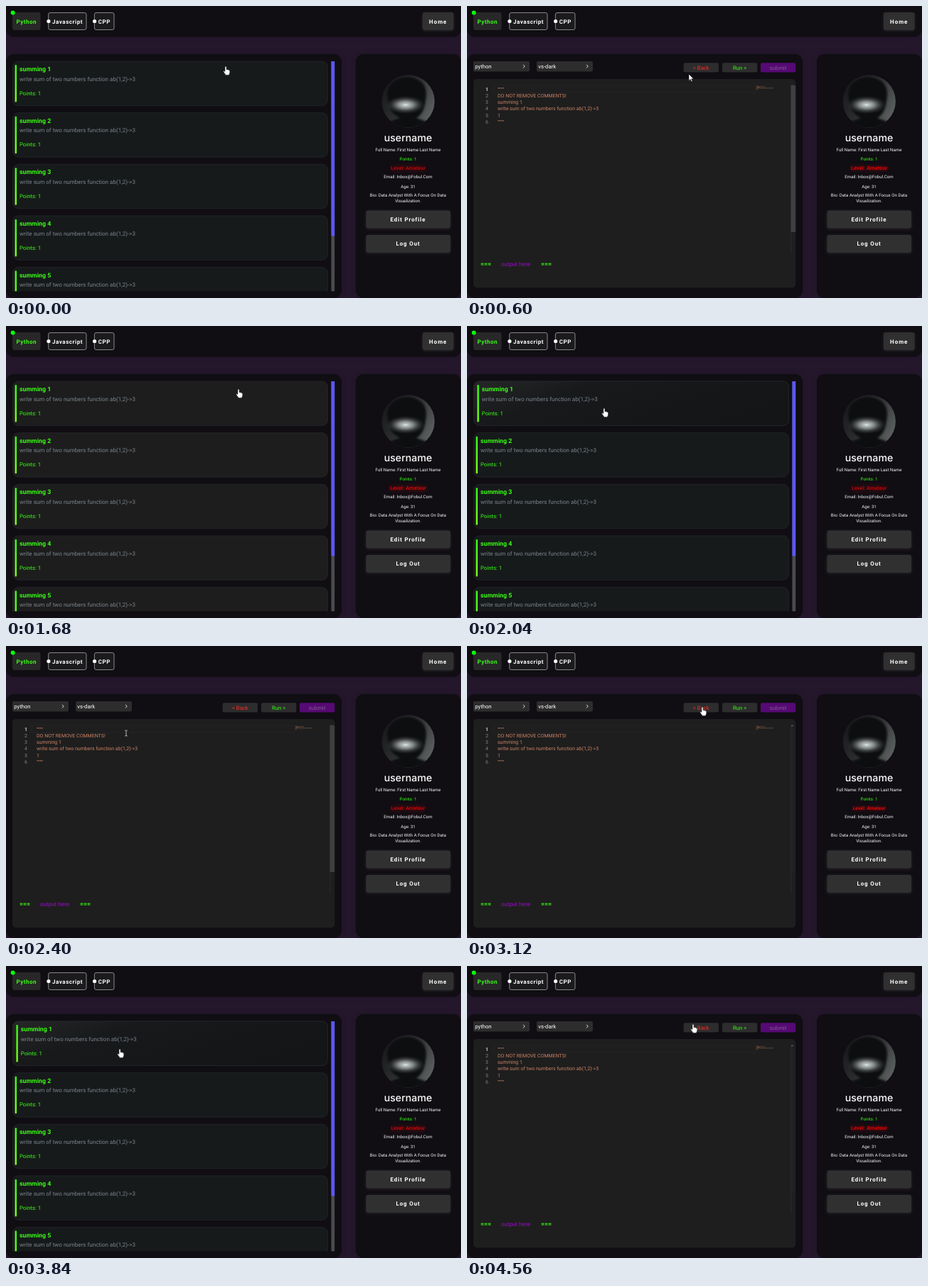
An HTML page that plays this animation: 640x412 px, repeating every 4.68 s.

```html
<!DOCTYPE html>
<html lang="en">
<head>
<meta charset="utf-8">
<title>Coding tasks</title>
<style>
  html, body { margin: 0; width: 100%; height: 100%; overflow: hidden; background: #24172c; }
  svg { display: block; width: 100%; height: 100%; }
  text { font-family: Roboto, "Open Sans", sans-serif; text-rendering: geometricPrecision; white-space: pre; }
  .soft { filter: drop-shadow(0 0 3px rgba(0, 0, 0, .2)); }
  .lift { filter: drop-shadow(0 1px 2px rgba(60, 60, 60, .55)); }
  .wide { font-family: Inter, sans-serif; }
  .plain { font-family: "Liberation Sans", sans-serif; }
  .quote { font-family: "Open Sans", "Noto Sans", sans-serif; }
</style>
</head>
<body>
<svg id="stage" viewBox="0 0 640 412" xmlns="http://www.w3.org/2000/svg"></svg>
<script>
const LOOP = 4680, STEP = 120;
const GREEN = '#39ff14';

// Screen changes: start time and which view is shown
const VIEWS = [[0, 'list'], [600, 'editor'], [1560, 'list'], [2280, 'editor'], [3360, 'list'], [4080, 'editor']];

// Pointer hot spot: time, x, y
const PATH = [
  [0, 309, 86], [240, 310, 87], [600, 312, 96], [1080, 312.5, 97], [1440, 326, 89], [1680, 327, 90],
  [2160, 168, 122], [2400, 169, 123], [2640, 176, 122], [3120, 331, 87], [3360, 330, 87],
  [3840, 160, 118], [4080, 162, 118], [4560, 318, 83], [4680, 309, 86]
];

const rect = (x, y, w, h, fill, r = 0, more = '') =>
  `<rect x="${x}" y="${y}" width="${w}" height="${h}" rx="${r}" fill="${fill}" ${more}/>`;
const dot = (x, y, r, fill) => `<circle cx="${x}" cy="${y}" r="${r}" fill="${fill}"/>`;
const text = (s, x, y, size, fill, { w = 400, a = 'start', ls = 0, c = '' } = {}) =>
  `<text class="${c}" x="${x}" y="${y}" font-size="${size}" fill="${fill}" font-weight="${w}" text-anchor="${a}" letter-spacing="${ls}">${s}</text>`;
const mid = (s, y, size, fill, o = {}) => text(s, 565.5, y, size, fill, { a: 'middle', ...o });

const defs = `<defs>
  <linearGradient id="hover" x2="1" y2=".4">
    <stop offset="0" stop-color="#262727"/><stop offset=".35" stop-color="#17191b"/><stop offset="1" stop-color="#131517"/>
  </linearGradient>
  <linearGradient id="bar" x2="0" y2="1">
    <stop offset="0" stop-color="#35ff14"/><stop offset="1" stop-color="#7cff14"/>
  </linearGradient>
  <linearGradient id="photo" x2="1" y2=".6">
    <stop offset="0" stop-color="#121314"/><stop offset=".5" stop-color="#2a2c2d"/><stop offset="1" stop-color="#5a5e5e"/>
  </linearGradient>
  <radialGradient id="gleam">
    <stop offset="0" stop-color="#dde4e4"/><stop offset=".4" stop-color="#9aa1a1" stop-opacity=".8"/><stop offset="1" stop-color="#333" stop-opacity="0"/>
  </radialGradient>
  <clipPath id="round"><circle cx="565.7" cy="134.5" r="37.2"/></clipPath>
  <clipPath id="scroll"><rect x="0" y="77" width="456" height="325.5"/></clipPath>
</defs>`;

function frame() {
  return rect(0, 0, 640, 412, '#24172c')
    + rect(0, -14, 640, 57.5, '#100d13', 11, 'class="soft"')
    + rect(0, 68, 472, 344, '#100d13', 11, 'class="soft"')
    + rect(492, 68, 148, 344, '#100d13', 11, 'class="soft"');
}

function nav() {
  const o = { w: 700, ls: .55 };
  const tab = (x, w, s) => rect(x, 9.5, w, 24, '#1b1a1c', 2.5, 'stroke="#a8a8a8" stroke-width=".8"')
    + dot(x + .2, 21.5, 2.6, '#fff') + text(s, x + 5.3, 24.5, 8, '#fff', o);
  return rect(9, 9, 39.5, 25, '#282829', 3) + dot(9.7, 9.6, 3, '#0bff0b') + text('Python', 14.4, 24.5, 8, GREEN, o)
    + tab(59.7, 53.3, 'Javascript') + tab(124.4, 27.6, 'CPP')
    + rect(586, 9, 43.5, 25, '#303030', 3, 'class="lift"')
    + text('Home', 595, 24.5, 8, '#fff', { w: 700, ls: 1 });
}

function profile() {
  const button = (y, s) => rect(506.5, y, 118.5, 25, '#303030', 3, 'class="lift"')
    + mid(s, y + 15.4, 8, '#fff', { w: 700, ls: .85 });
  const photo = `<g clip-path="url(#round)">${rect(528, 97, 76, 75, 'url(#photo)')}
    <path d="M537 131Q534 112 549 104Q566 95 583 106Q594 115 590 134Q588 152 577 158L600 166V174H531V166L554 158Q539 151 537 131Z" fill="#0d0e0f" style="filter:blur(1.5px)"/>
    <ellipse cx="562" cy="139.5" rx="28" ry="13" fill="url(#gleam)"/></g>`;
  return photo
    + mid('username', 191, 14.2, '#fff', { w: 500, c: 'wide' })
    + mid('Full Name: First Name Last Name', 205.3, 6.15, '#f4f4f4')
    + mid('Points: 1', 218.2, 6.15, GREEN)
    + `<g id="level">${text('Level: Amateur', 0, 2.6, 7.5, '#f00', { w: 500, a: 'middle', ls: .15 })}</g>`
    + mid('Email: Inbox@Fobul.Com', 243.4, 6.15, '#f4f4f4')
    + mid('Age: 31', 256.6, 6.15, '#f4f4f4')
    + mid('Bio: Data Analyst With A Focus On Data', 269.3, 6.15, '#f4f4f4')
    + mid('Visualization.', 277, 6.15, '#f4f4f4')
    + button(288.5, 'Edit Profile') + button(323, 'Log Out');
}

function list() {
  let cards = '';
  for (let i = 0; i < 5; i++) {
    const y = 78 + i * 72.65;
    cards += rect(9.5, y, 443, 62.5, '#171a1b', 8, 'class="card" stroke="#24282a" stroke-width=".8"')
      + (i ? '' : rect(9.5, y, 443, 62.5, 'url(#hover)', 8, 'id="glow" stroke="#24282a" stroke-width=".8"'))
      + `<g ${i ? '' : 'id="first"'}>${rect(12.6, y + 5, 2.4, 52.5, 'url(#bar)', 1)}`
      + text(`summing ${i + 1}`, 19, y + 14, 8.8, GREEN, { w: 600 })
      + text('write sum of two numbers function ab(1,2)-&gt;3', 19, y + 27.7, 8.05, '#7b848c')
      + text('Points: 1', 19, y + 47.6, 7.75, GREEN) + '</g>';
  }
  return `<g id="list"><g clip-path="url(#scroll)">${cards}</g>`
    + rect(457.5, 78, 4.7, 324.5, '#4b4b4b') + rect(457.5, 78, 4.7, 246.5, '#5b57f5') + '</g>';
}

function editor() {
  const select = (x, s) => rect(x, 78, 79, 14.5, '#2d2d2e', 2) + text(s, x + 2.3, 88, 7.7, '#fff')
    + `<path d="M${x + 70} 82.8l2.2 2.3l-2.2 2.3" fill="none" stroke="#ddd" stroke-width="1"/>`;
  const button = (x, s, bg, fg) => rect(x, 80.2, 49.3, 13.2, bg, 2)
    + text(s, x + 24.7, 89.6, 7.7, fg, { a: 'middle' });
  const lines = ['"""', 'DO NOT REMOVE COMMENTS!', 'summing 1', 'write sum of two numbers function ab(1,2)-&gt;3', '1', '"""'];
  const code = lines.map((s, i) => {
    const y = 119.5 + i * 9.3;
    const quote = s[0] === '"';
    return text(i + 1, 30, y, 7, i ? '#858585' : '#d0d0d0', { a: 'end', w: i ? 400 : 600 })
      + text(s, 43, y, 7.03, '#cc8266', quote ? { c: 'quote', w: 600 } : {})
      + rect(407, 112.6 + i, [2, 12, 5, 24, 1, 2][i], .6, '#8a5a48');
  }).join('');
  return '<g id="editor">' + select(9, 'python') + select(98, 'vs-dark')
    + button(304.7, '&lt; Back', '#2d2d2e', '#ff2a20') + button(359, 'Run &gt;', '#2d2d2e', GREEN)
    + button(413, 'submit', '#560a74', '#7f5b8c')
    + rect(9, 103, 453.3, 294.5, '#1e1e1e', 5)
    + rect(36, 112, 369, 10, 'none', 0, 'stroke="#272727" stroke-width=".8"')
    + code
    + rect(455.6, 112, .7, 237, '#303030') + rect(456, 111.8, 3, .8, '#8c8c8c')
    + rect(455.6, 112, 6.6, 207, '#3f3f3f', 0, 'id="thumb"')
    + text('===', 19, 367.2, 8.8, GREEN, { w: 700 }) + text('===', 104, 367.2, 8.8, GREEN, { w: 700 })
    + text('output here', 48, 367, 8.2, '#9d0bd0', { c: 'plain' })
    + '</g>';
}

const pointers = `
  <path id="arrow" d="M0 0V9.4L2.2 7.4L3.7 10.8L5.2 10.1L3.7 6.8H6.7Z" fill="#fff" stroke="#111" stroke-width=".6"/>
  <path id="hand" d="M-1 0Q0 -1.8 1.1 0V3.6Q2.2 3 2.8 4Q4 3.5 4.4 4.5Q5.8 4.2 5.8 5.8V8Q5.7 9.4 4.8 10.4V11.4H-.4V10.4Q-2 8.7 -3.3 6.5Q-3 5.1 -1 6.4Z" fill="#fff" stroke="#111" stroke-width=".5"/>
  <path id="beam" d="M-1.8 -4Q0 -4 0 -3V3Q0 4 -1.8 4M1.8 -4Q0 -4 0 -3M0 3Q0 4 1.8 4" fill="none" stroke="#d8d8d8" stroke-width=".8"/>`;

const $ = id => document.getElementById(id);
$('stage').innerHTML = defs + frame() + nav() + profile() + list() + editor() + pointers;
const cards = document.querySelectorAll('.card');

const clamp = v => Math.max(0, Math.min(1, v));
const smooth = v => { v = clamp(v); return v * v * (3 - 2 * v); };
const show = (id, on) => $(id).setAttribute('visibility', on ? 'visible' : 'hidden');

function pointerAt(t) {
  const i = PATH.findIndex(p => p[0] > t);
  const [t0, x0, y0] = PATH[i - 1], [t1, x1, y1] = PATH[i];
  const k = smooth((t - t0) / (t1 - t0));
  return [x0 + (x1 - x0) * k, y0 + (y1 - y0) * k];
}

function pointerKind(view, x, y) {
  if (view === 'list') return 'hand';
  if (x > 304 && x < 354 && y > 80 && y < 93.5) return 'hand';
  return y > 103 ? 'beam' : 'arrow';
}

function draw(t) {
  const [start, view] = VIEWS.filter(v => v[0] <= t).pop();
  const age = t - start;
  show('list', view === 'list');
  show('editor', view === 'editor');

  const hover = smooth((age - 120) / 360);
  $('first').setAttribute('transform', `translate(${1.8 * hover} 0)`);
  $('glow').setAttribute('opacity', hover);
  const fresh = start > 0 && age < 240;
  cards.forEach(c => c.setAttribute('fill', fresh ? '#1d1d1d' : '#171a1b'));
  $('thumb').setAttribute('opacity', 1 - .9 * smooth((age - 120) / 360));

  const [x, y] = pointerAt(t);
  const kind = pointerKind(view, x, y);
  for (const id of ['arrow', 'hand', 'beam']) show(id, id === kind);
  $(kind).setAttribute('transform', `translate(${x} ${y})`);

  // Slow breathing of the level label
  const pulse = Math.cos((t - 1100) / 4000 * 2 * Math.PI);
  const calm = Math.abs(pulse);
  const level = $('level');
  level.setAttribute('transform', `translate(565.7 228.6) scale(${.94 + .06 * pulse})`);
  level.setAttribute('opacity', .76 + .2 * calm);
  level.style.filter = `drop-shadow(0 0 ${4 - 1.6 * calm}px rgba(255,0,0,.9))`;
}

function tick(now) {
  draw(Math.floor(now % LOOP / STEP) * STEP);
  requestAnimationFrame(tick);
}
draw(0);
requestAnimationFrame(tick);
</script>
</body>
</html>
```
